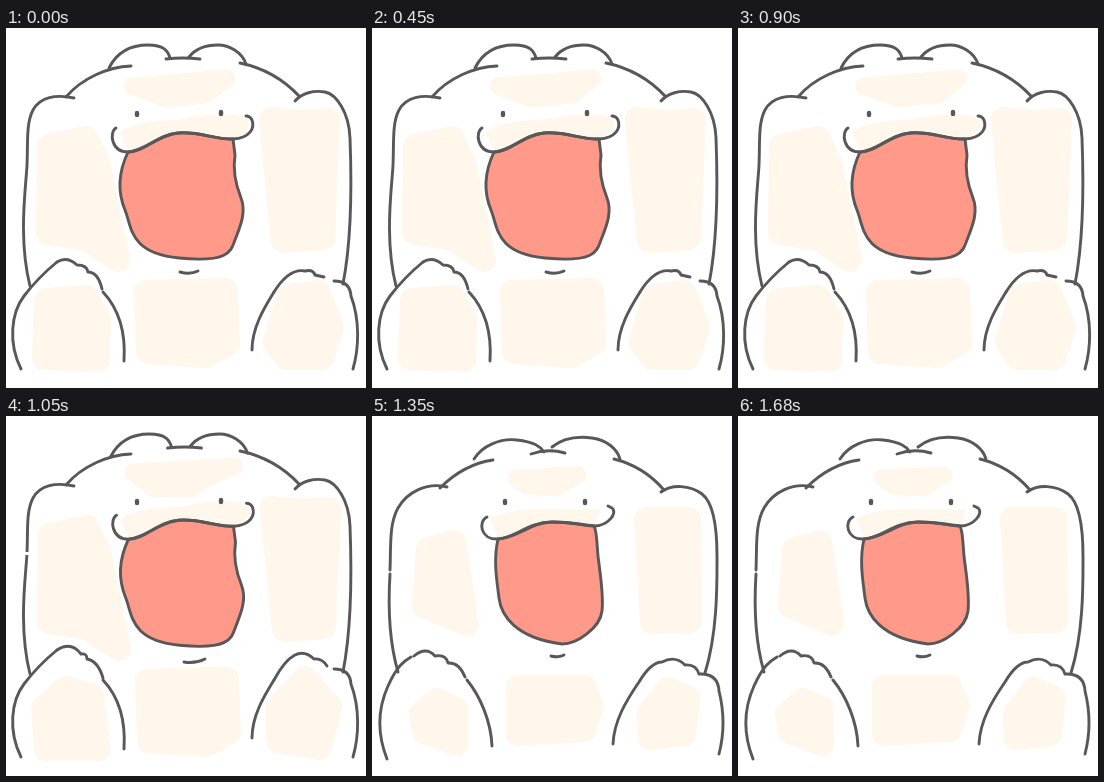
Animation, 360 px wide and 360 px high, one loop 1.83 s. Source, as an HTML page without scripts:

```html
<!DOCTYPE html>
<html lang="en">
<head>
<meta charset="utf-8">
<title>Happy wobble</title>
<style>
html, body { margin: 0; width: 100%; height: 100%; overflow: hidden; background: #fff; }
svg { display: block; width: 100%; height: 100%; }
path { fill: none; stroke: #595757; stroke-width: 2.9; stroke-linecap: round; stroke-linejoin: round; }
/* Patches are small polygons rounded off by a thick outline. */
.patch { fill: #fff6ec; stroke: #fff6ec; stroke-width: 24; }
.brow { stroke-width: 17; }
.snout { stroke-width: 0; }
.mouth { fill: #ff998a; }
.eyes { stroke-width: 4.4; }
.gap { stroke: #fff; stroke-width: 4; stroke-linecap: butt; }
.pose { visibility: hidden; animation: 1830ms step-end infinite; }
.wide1 { animation-name: wide1; }
.wide2 { animation-name: wide2; }
.wide3 { animation-name: wide3; }
.mid { animation-name: mid; }
.squash { animation-name: squash; }

/* Three wide poses cycle three times, then the body squashes and returns. */
@keyframes wide1 {
  0%, 24.59%, 49.18% { visibility: visible; }
  8.196%, 32.786%, 57.377%, 100% { visibility: hidden; }
}
@keyframes wide2 {
  8.196%, 32.786%, 57.377% { visibility: visible; }
  0%, 16.393%, 40.983%, 65.573%, 100% { visibility: hidden; }
}
@keyframes wide3 {
  16.393%, 40.983%, 65.573% { visibility: visible; }
  0%, 24.59%, 49.18%, 73.77%, 100% { visibility: hidden; }
}
@keyframes mid {
  73.77%, 91.803%, 100% { visibility: visible; }
  0%, 81.967% { visibility: hidden; }
}
@keyframes squash {
  81.967% { visibility: visible; }
  0%, 91.803%, 100% { visibility: hidden; }
}
</style>
</head>
<body>
<svg viewBox="0 0 360 360">
<defs>
  <g id="patches">
    <path class="patch" d="M43 118L80 110 92 135 112 232 80 211 42 205Z"/>
    <path class="patch" d="M265 91L295 94 322 92 317 210 277 213 271 155Z"/>
    <path class="patch" d="M140 264L220 262 222 315 200 328 142 324Z"/>
  </g>
  <g id="legPatches">
    <path class="patch" d="M40 272L80 269 93 290 92 332 38 330Z"/>
    <path class="patch" d="M282 268L312 264 326 300 316 330 280 330 269 314Z"/>
  </g>
  <g id="face">
    <path class="patch snout" d="M114 104Q130 92 170 92Q230 80 242 92Q246 104 228 110L122 122Z"/>
    <path class="mouth" d="M122 124C112 145 112 165 119 182S123 225 173 230S225 223 229 212S241 185 235 170S227 140 229 127L227 111C210 112 192 103 172 105S139 123 122 124Z"/>
    <path d="M110 100C103 104 105 124 122 124S150 107 172 105S210 112 227 111S249 100 246 92Q244 88 240 88"/>
  </g>
  <path id="ears" d="M103 40C112 22 126 17 142 17S162 23 164 30M183 29C190 20 201 17 212 17S236 24 240 36M160 31Q177 29 194 31"/>
  <g id="body">
    <path d="M125 38C102 39 76 50 60 69M234 35C258 40 278 52 293 68"/>
    <path d="M68 70C50 66 34 69 27 82S22 115 21 137S12 210 24 258M289 73C296 65 308 62 319 64S343 84 344 110S347 205 337 256"/>
    <path d="M15 341C2 315 5 285 18 268S40 243 51 234M97 264C111 279 120 302 118 333M246 322C246 300 258 280 268 264M328 253Q344 253 345 268C354 292 353 320 347 341"/>
    <path class="eyes" d="M131 85v2M215 84v2"/>
  </g>
</defs>

<g class="pose wide1">
  <use href="#patches"/>
  <use href="#legPatches"/>
  <path class="patch brow" d="M126 58L221 50 200 67 160 71Z"/>
  <use href="#face"/>
  <use href="#ears"/>
  <use href="#body"/>
  <path d="M51 234Q61 228 71 237Q81 237 82 244Q92 244 96 261M268 264Q283 240 299 243Q307 241 309 247L318 249M174 244Q184 247 192 243"/>
</g>

<g class="pose wide2">
  <use href="#patches" x="1" y="1"/>
  <path class="patch" d="M37 292L60 272 86 280 93 333 40 333Z"/>
  <path class="patch" d="M271 292L299 262 324 290 314 332 272 325Z"/>
  <path class="patch brow" d="M127 56L229 50 200 63 185 73 148 73Z"/>
  <use href="#face" x=".5" y="-.8"/>
  <use href="#ears" x="1.5" y="1"/>
  <use href="#body"/>
  <path d="M51 234Q65 225 75 238Q81 237 81 243Q92 245 97 262M268 264Q289 225 308 243Q316 242 321 250M178 246Q189 248 199 243"/>
  <path class="gap" d="M21 136v3"/>
</g>

<g class="pose wide3">
  <use href="#patches" y="2"/>
  <use href="#legPatches" x="1" y="1"/>
  <path class="patch brow" d="M125 57L227 54 190 72 155 72Z"/>
  <use href="#face" x="1"/>
  <use href="#ears" x="1" y="1"/>
  <use href="#body"/>
  <path d="M47 236Q57 227 65 234Q74 231 78 240M86 244Q97 248 97 264M268 264Q274 251 282 248Q292 239 301 243Q309 240 311 246L320 249M173 245Q183 247 192 244"/>
  <path class="gap" d="M21 135v3M341 214v7"/>
</g>

<g class="pose mid">
  <path class="patch brow" d="M144 62L206 59 185 72 155 70Z"/>
  <path class="patch snout" d="M118 102Q140 92 175 93T228 93L223 109 126 121Z"/>
  <path class="patch" d="M56 133L82 126 86 150 94 208 52 190Z"/>
  <path class="patch" d="M274 103L317 103 318 205 280 206Z"/>
  <path class="patch" d="M146 271L212 271 220 290 212 314 146 318Z"/>
  <path class="patch" d="M49 298L65 284 84 292 84 328 52 316Z"/>
  <path class="patch" d="M277 298L296 273 316 282 312 318 278 322Z"/>
  <path class="mouth" d="M126 123C121 145 125 165 127 182S143 222 190 228C205 228 228 212 230 195S227 150 226 140S225 115 222 110C212 109 200 106 180 106S145 122 126 123Z"/>
  <path d="M115 101C106 105 108 124 126 123S155 106 180 106S208 110 222 110S246 97 240 92L236 90M179 240Q186 242 192 239"/>
  <path d="M102 43C110 30 128 22 145 24S168 30 172 36M180 31C190 23 205 20 220 22S245 33 248 43M159 38Q176 32 193 37M121 44C100 47 82 58 68 72M242 43C262 48 280 60 292 74"/>
  <path d="M75 71C55 66 35 76 26 92S19 130 18 154M18 158C16 190 17 225 26 256M289 76C300 68 318 69 330 78S345 115 345 140S346 215 333 257"/>
  <path d="M15 343C4 315 7 290 16 270S32 245 39 241M42 240Q54 230 63 240Q74 238 76 247Q87 246 93 261M95 264C108 280 119 305 120 330"/>
  <path d="M241 328C242 305 254 285 267 266Q279 246 290 246Q303 239 313 249Q324 248 327 258Q346 257 347 275C352 295 353 315 347 338"/>
  <path class="eyes" d="M133 85v2M213 85v2"/>
</g>

<g class="pose squash">
  <path class="patch brow" d="M157 63L182 62 180 65 160 65Z"/>
  <path class="patch snout" d="M147 99Q165 90 182 94Q200 88 199 102V109H148Z"/>
  <path class="patch snout" d="M175 246Q177 239 190 240Q195 248 180 251Z"/>
  <path class="patch" d="M66 138L84 136 92 155 86 190 68 190Z"/>
  <path class="patch" d="M280 160L295 118 304 150 288 177Z"/>
  <path class="patch" d="M173 293L188 286 197 294 180 296Z"/>
  <path class="patch" d="M48 308L65 290 85 305 70 320 50 318Z"/>
  <path class="patch" d="M272 312L300 295 317 310 300 326 274 322Z"/>
  <path class="mouth" d="M132 114C126 135 128 160 132 178S142 212 160 212Q172 213 178 217Q212 219 217 202C222 185 221 150 219 110C205 110 195 106 178 105S148 113 132 114Z"/>
  <path d="M115 103C111 112 119 116 132 114S160 107 178 105S204 110 219 110S239 101 236 93M181 234H186"/>
  <path d="M107 49C112 35 125 22 145 20S169 28 173 42M178 44C184 30 198 22 212 22S239 34 242 48M164 46Q177 43 189 46M125 45C108 50 92 60 78 72M237 50C258 52 276 62 287 74"/>
  <path d="M76 72C52 70 32 84 23 108S3 195 29 250M286 74C305 70 325 76 336 96S355 190 331 262"/>
  <path d="M14 343C5 320 8 295 18 272S38 240 54 239Q62 239 67 245Q75 245 80 255M81 263C100 278 114 300 119 325"/>
  <path d="M239 328C241 305 252 285 271 267M274 264Q301 238 316 260M320 262Q338 260 340 275C349 295 350 315 344 335"/>
  <path class="eyes" d="M135 84v2M211 85v2"/>
</g>
</svg>
</body>
</html>
```
